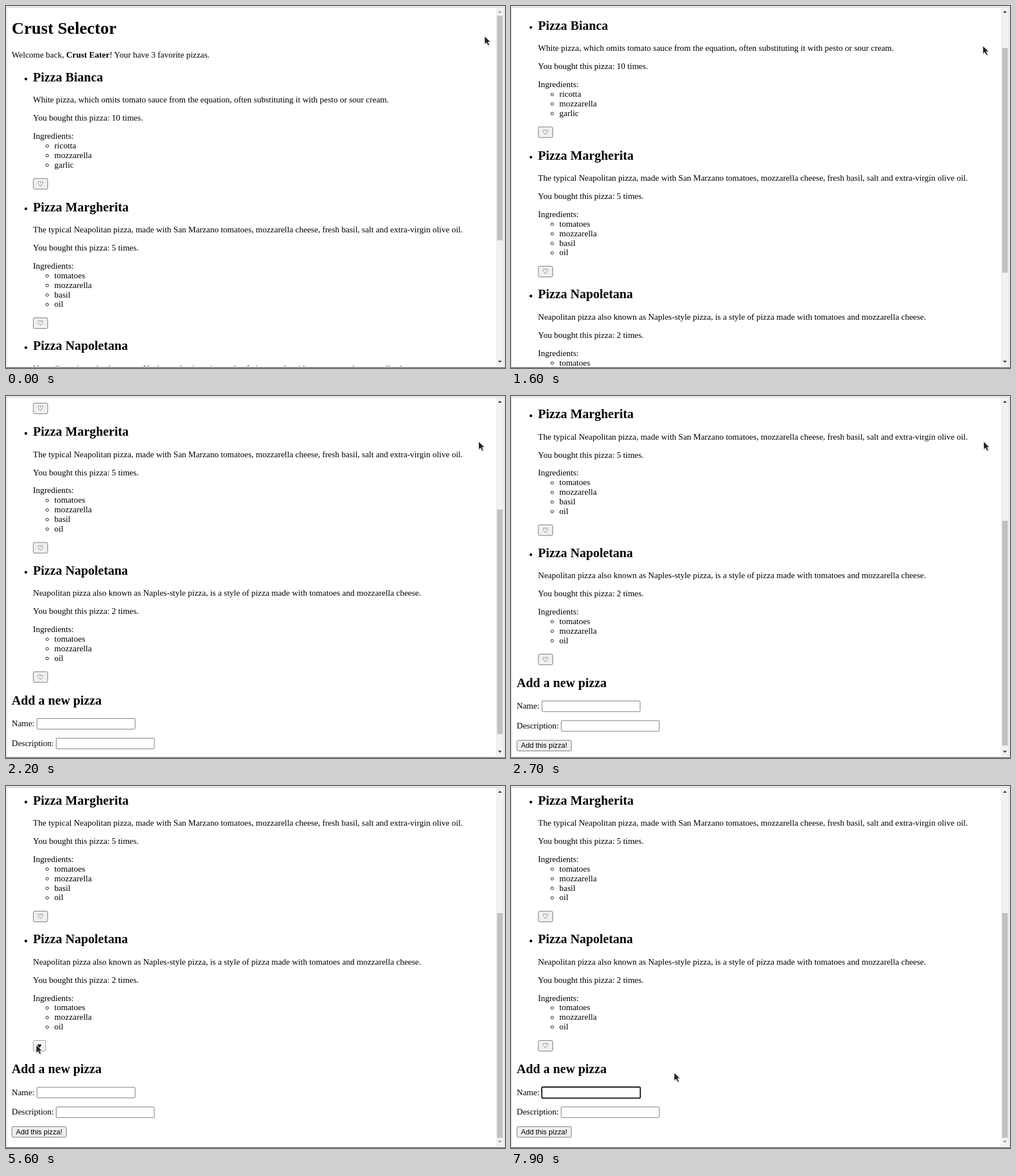
These frames come from a looping animation (878x638 px, 8000 ms). An HTML page:

```html
<!DOCTYPE html>
<html lang="en">
<head>
<meta charset="utf-8">
<style>
html, body { margin: 0; width: 100%; height: 100%; overflow: hidden; }
#stage { position: relative; width: 878px; height: 638px; overflow: hidden; background: #e9e9e9; }
#stage > * { position: absolute; }
#edge { left: 2px; top: 2px; width: 874px; height: 1px; background: #d6d6d6; }
#base { left: 0; top: 637px; width: 878px; height: 1px; background: #4a4a4a; }
#view { left: 2px; top: 3px; width: 860px; height: 632px; overflow: hidden; background: #fffffe; }
#page {
  display: flow-root; width: 901.3px; padding: 0 8px; transform-origin: 0 0;
  font: 16px "Liberation Serif", "Times New Roman", serif; color: #000;
}
.button, .field { display: inline-block; box-sizing: border-box; height: 21px; border: 1px solid #6a6a6a; }
.button {
  padding: 0 7px; border-radius: 3px; background: #efefef; vertical-align: top;
  font: 13.333px/19px "Liberation Sans", "DejaVu Sans", sans-serif;
}
.hover { background: #e5e5e5; border-color: #4f4f4f; }
.pressed { background: #f5f5f5; border-color: #8d8d8d; }
.field { position: relative; width: 185px; border-radius: 2px; background: #fff; vertical-align: -6px; }
.focus { outline: 2px solid #101010; outline-offset: -1px; }
#caret { position: absolute; left: 2px; top: 2px; width: 1px; height: 15px; background: #000; }
.row { margin: 16px 0; }
li > .row { margin-bottom: 0; }
#bar { left: 862px; top: 3px; width: 13px; height: 632px; background: #f1f1f1; }
#thumb { left: 864px; width: 10px; height: 396px; background: #c1c1c1; }
#overlay { left: 0; top: 0; }
</style>
</head>
<body>
<div id="stage">
  <div id="edge"></div>
  <div id="base"></div>
  <div id="view"><div id="page">
    <h1>Crust Selector</h1>
    <p>Welcome back, <b>Crust Eater</b>! Your have 3 favorite pizzas.</p>
    <ul id="pizzas"></ul>
    <h2>Add a new pizza</h2>
    <div class="row">Name: <span class="field" id="name"><i id="caret"></i></span></div>
    <div class="row">Description: <span class="field"></span></div>
    <div class="row"><span class="button">Add this pizza!</span></div>
  </div></div>
  <div id="bar"></div>
  <div id="thumb"></div>
  <svg id="overlay" width="878" height="638">
    <path id="up" d="M865.5 12h7l-3.5-4z"/>
    <path id="down" d="M865.5 625h7l-3.5 4z"/>
    <g id="arrow">
      <path d="M1 1.5v15l3.6-3 2.6 5.3 3-1.4-2.5-5 4.3-.3z" opacity=".15"/>
      <path d="M0 0v14.5l3.4-2.9 2.6 5.2 2.7-1.3-2.5-4.9 4.3-.3z" fill="#222" stroke="#fff" stroke-width=".9"/>
    </g>
    <path id="beam" d="M-3-7.5h2.2L0-6.7.8-7.5H3M0-6.7V6.7M-3 7.5h2.2L0 6.7l.8.8H3" fill="none" stroke="#222" stroke-width="1.2"/>
  </svg>
</div>
<script>
const $ = id => document.getElementById(id);
const LOOP = 8000, TICK = 100, MAX_SCROLL = 329;

const pizza = (name, about, count, ...parts) => `<li>
  <h2>${name}</h2><p>${about}</p><p>You bought this pizza: ${count} times.</p>
  <div>Ingredients:<ul>${parts.map(part => `<li>${part}</li>`).join("")}</ul></div>
  <div class="row"><span class="button heart">♡</span></div></li>`;
$("pizzas").innerHTML =
  pizza("Pizza Bianca", "White pizza, which omits tomato sauce from the equation, often substituting it with pesto or sour cream.", 10, "ricotta", "mozzarella", "garlic") +
  pizza("Pizza Margherita", "The typical Neapolitan pizza, made with San Marzano tomatoes, mozzarella cheese, fresh basil, salt and extra-virgin olive oil.", 5, "tomatoes", "mozzarella", "basil", "oil") +
  pizza("Pizza Napoletana", "Neapolitan pizza also known as Naples-style pizza, is a style of pizza made with tomatoes and mozzarella cheese.", 2, "tomatoes", "mozzarella", "oil");
const heart = [...document.querySelectorAll(".heart")].pop();

// Follows legs of { from, to, goal }, slowing down towards each goal.
function glide(t, origin, legs) {
  return legs.reduce((at, { from, to, goal }) => {
    const f = Math.min(1, Math.max(0, (t - from) / (to - from)));
    return at.map((v, i) => v + (goal[i] - v) * (1 - (1 - f) ** 2));
  }, origin);
}

const wheel = [
  { from: 1300, to: 1700, goal: [97] },
  { from: 1800, to: 2200, goal: [291.5] },
  { from: 2400, to: 2700, goal: [322.5] },
  { from: 2900, to: 3100, goal: [MAX_SCROLL] }
];
const mouse = [
  { from: 600, to: 1200, goal: [829, 62] },
  { from: 1400, to: 2200, goal: [831.5, 80] },
  { from: 2900, to: 3700, goal: [149.5, 488] }, // title
  { from: 3700, to: 4500, goal: [53, 456] },    // heart
  { from: 6200, to: 6900, goal: [130, 545] },   // name field
  { from: 7300, to: 7500, goal: [207, 500] },
  { from: 7600, to: 7900, goal: [287, 505] }
];

function draw(now) {
  const t = Math.floor(now % LOOP / TICK) * TICK;
  const during = (from, to) => t >= from && t < to;
  const [scroll] = glide(t, [0], wheel);
  const [x, y] = glide(t, [842, 53], mouse);
  const inside = (left, top, right, bottom) => x >= left && x < right && y >= top && y < bottom;

  $("page").style.transform = `translate(.6px, ${-0.4 - scroll}px) scale(.9375)`;
  $("thumb").style.top = 17 + scroll * 0.628 + "px";
  $("up").style.fill = scroll > 0 ? "#505050" : "#a3a3a3";
  $("down").style.fill = scroll < MAX_SCROLL ? "#505050" : "#a3a3a3";

  heart.textContent = during(4900, 5900) ? "♥" : "♡";
  heart.classList.toggle("hover", inside(48, 448, 74, 468));
  heart.classList.toggle("pressed", during(4700, 4900) || during(5600, 5900));
  $("name").classList.toggle("focus", t >= 6900);
  $("caret").hidden = !during(6900, 7400);
  $("caret").style.display = $("caret").hidden ? "none" : "block";

  const overText = inside(10, 487, 168, 512) || inside(54, 530, 228, 550);
  $("arrow").style.display = overText ? "none" : "";
  $("beam").style.display = overText ? "" : "none";
  for (const id of ["arrow", "beam"]) $(id).setAttribute("transform", `translate(${x} ${y})`);
}

const start = performance.now();
function loop() {
  draw(performance.now() - start);
  requestAnimationFrame(loop);
}
loop();
</script>
</body>
</html>
```
